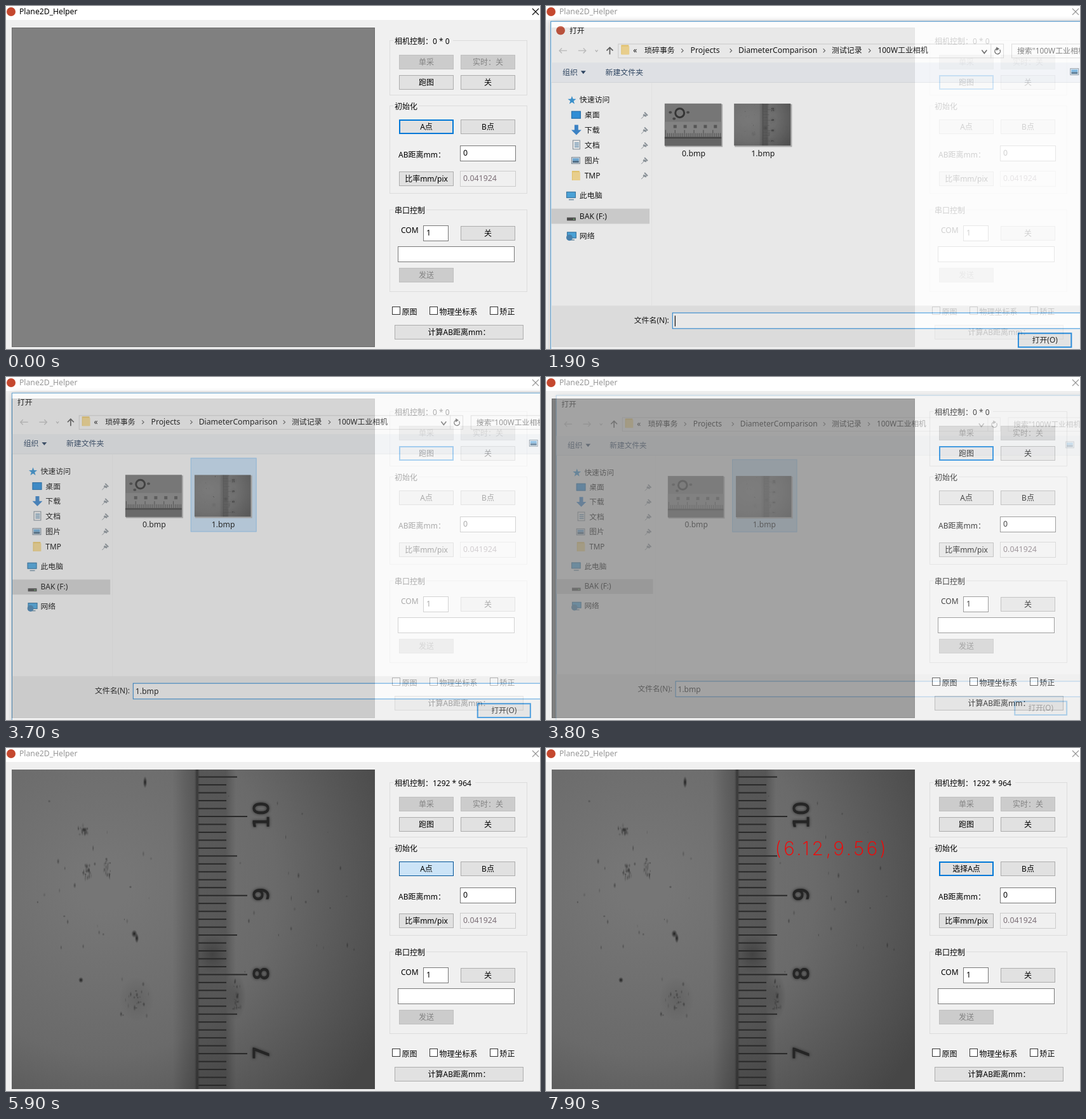
An HTML page with a canvas for the animation above (8000 ms loop, 841 px wide and 541 px high).

```html
<!DOCTYPE html>
<html lang="zh">
<head>
<meta charset="utf-8">
<style>
html, body { margin: 0; width: 100%; height: 100%; overflow: hidden; background: #f0f0f0; }
canvas { position: absolute; left: 0; top: 0; }
</style>
</head>
<body>
<canvas id="main" width="841" height="541"></canvas>
<canvas id="dialog" width="841" height="541"></canvas>
<script>
const LOOP = 8000, STEP = 100;
const BLUE = '#0078d7', SANS = '"Noto Sans","Noto Sans CJK SC","Noto Sans CJK",sans-serif';
const dialogCanvas = document.getElementById('dialog');
const mainCtx = document.getElementById('main').getContext('2d');
const dialogCtx = dialogCanvas.getContext('2d');
let g = mainCtx;

// Linear interpolation over [time, ...values] keys.
function track(t, keys) {
  if (t <= keys[0][0]) return keys[0].slice(1);
  for (let i = 1; i < keys.length; i++) {
    const [a, b] = [keys[i - 1], keys[i]];
    if (t <= b[0]) return a.slice(1).map((v, k) => v + (b[k + 1] - v) * (t - a[0]) / (b[0] - a[0]));
  }
  return keys[keys.length - 1].slice(1);
}

function fill(x, y, w, h, color) { g.fillStyle = color; g.fillRect(x, y, w, h); }
function frame(x, y, w, h, color, line = 1) {
  g.strokeStyle = color; g.lineWidth = line;
  g.strokeRect(x + line / 2, y + line / 2, w - line, h - line);
}
function box(x, y, w, h, color, edge, line) { fill(x, y, w, h, color); frame(x, y, w, h, edge, line); }
function text(s, x, y, { color = '#000', size = 12, align = 'left' } = {}) {
  g.font = `${size}px ${SANS}`; g.textAlign = align; g.fillStyle = color;
  g.fillText(s, x, y + 4.5);
}
function poly(color, line, ...pts) {
  g.beginPath();
  for (let i = 0; i < pts.length; i += 2) g.lineTo(pts[i], pts[i + 1]);
  if (line) { g.strokeStyle = color; g.lineWidth = line; g.stroke(); }
  else { g.fillStyle = color; g.fill(); }
}
function dot(x, y, rx, ry, color) {
  g.beginPath(); g.ellipse(x, y, rx, ry, 0, 0, 7); g.fillStyle = color; g.fill();
}
function smudge(x, y, rx, ry, alpha) {
  g.save();
  g.translate(x, y); g.scale(rx, ry);
  const soft = g.createRadialGradient(0, 0, 0, 0, 0, 1);
  soft.addColorStop(0, `rgba(20,20,20,${alpha})`); soft.addColorStop(1, 'rgba(20,20,20,0)');
  dot(0, 0, 1, 1, soft);
  g.restore();
}
function chevronRight(x, y) { poly('#555', 1.1, x - 1.5, y - 3, x + 1.5, y, x - 1.5, y + 3); }
function chevronDown(x, y, r, color, line) { poly(color, line, x - r, y - r, x, y + r * .3, x + r, y - r); }

const buttonLooks = {
  normal: ['#e1e1e1', '#adadad', 1], focus: ['#e1e1e1', BLUE, 2], hover: ['#e5f1fb', BLUE, 1],
  warm: ['#e3e9ee', '#57929f', 1], press: ['#cce4f7', '#005499', 1], off: ['#cccccc', '#bfbfbf', 1]
};
function button(x, y, label, look = 'normal', w = 86) {
  box(x, y, w, 23, ...buttonLooks[look]);
  text(label, x + w / 2, y + 11.5, { align: 'center', color: look === 'off' ? '#838383' : '#000' });
}
function group(y, h, label, w) {
  frame(604, y, 217, h, '#dcdcdc');
  fill(610, y - 5, w, 10, '#f0f0f0');
  text(label, 612, y + 1);
}

function photo() {
  g.save();
  g.beginPath(); g.rect(9, 34, 572, 504); g.clip();
  const glow = g.createRadialGradient(155, 215, 40, 155, 215, 500);
  glow.addColorStop(0, '#767676'); glow.addColorStop(.5, '#6a6a6a'); glow.addColorStop(1, '#464646');
  fill(9, 34, 572, 504, glow);
  const band = g.createLinearGradient(262, 0, 362, 0);
  [[0, 0], [.2, .12], [.35, .2], [.39, .5], [.43, .2], [.84, .2], [1, 0]]
    .forEach(([p, a]) => band.addColorStop(p, `rgba(0,0,0,${a})`));
  fill(262, 34, 100, 504, band);

  // Small stains on the plate, some of them gathered around [x, y, spread x, spread y].
  let seed = 7;
  const rnd = () => (seed = seed * 16807 % 2147483647) / 2147483647;
  const spread = () => rnd() + rnd() - 1;
  const stains = [[130, 230, 120, 190], [450, 230, 120, 190], [122, 129, 9, 9], [127, 196, 8, 16],
    [160, 188, 8, 20], [206, 396, 26, 36], [362, 392, 10, 34]];
  for (const [x, y, w, h] of stains) {
    for (let i = 0; i < 24; i++) {
      smudge(x + spread() * w, y + spread() * h, 1 + rnd() * 1.5, 1.5 + rnd() * 4, .15 + rnd() * .3);
    }
  }
  smudge(206, 396, 28, 36, .12);
  smudge(362, 392, 16, 38, .25);
  smudge(325, 325, 26, 30, .3);
  [[202, 293, 3, 4], [206, 300, 2, 5], [118, 366, 2.5, 3], [219, 54, 2, 6]].forEach(s => smudge(s[0], s[1], s[2] * 1.6, s[3] * 1.6, .9));

  // Millimetre scale, longer marks at every fifth and tenth.
  for (let i = -5; i < 35; i++) {
    const y = 108 + i * 12.47;
    const end = i % 10 === 0 ? 380 : i % 5 === 0 ? 364 : 347;
    fill(303, y - 1, end - 303, 2, '#292929');
  }
  g.font = '34px "DejaVu Sans",sans-serif'; g.textAlign = 'center';
  g.fillStyle = g.strokeStyle = '#222'; g.lineWidth = 1;
  [10, 9, 8, 7].forEach((n, i) => {
    g.save(); g.translate(414, 106 + i * 125); g.rotate(-Math.PI / 2);
    g.shadowColor = '#333'; g.shadowBlur = 4;
    g.fillText(n, 0, 0); g.strokeText(n, 0, 0); g.restore();
  });
  g.restore();
}

// Live coordinates next to the pointer, in millimetres from the image centre.
const pointerPath = [[6100, 520, 173], [6300, 430, 122], [6400, 395, 109], [6700, 339, 160],
  [7200, 310, 147], [7400, 310, 147], [7500, 330, 146], [7700, 378, 144], [7800, 378, 144], [7900, 364.3, 143]];
function coordinates(t) {
  const [left, top] = track(t, pointerPath);
  const x = left - 4.7, y = top + 23.8, mmPerPixel = 0.041924;
  const mmX = (x - 295) * 1292 / 572 * mmPerPixel, mmY = (286 - y) * 964 / 504 * mmPerPixel;
  g.save();
  g.beginPath(); g.rect(9, 34, 572, 504); g.clip();
  g.font = '200 30px Inter,"Open Sans",sans-serif';
  g.letterSpacing = '3.6px'; g.textAlign = 'left'; g.fillStyle = '#f00';
  g.fillText(`(${mmX.toFixed(2)},${mmY.toFixed(2)})`, x + 1, top + 26);
  g.restore();
}

function drawMain(t) {
  g = mainCtx;
  const loaded = t >= 4000, picking = t >= 6000;
  fill(0, 0, 841, 541, '#f0f0f0');
  fill(0, 0, 841, 22, '#fff');
  dot(8, 9, 7, 7, '#c5482f');
  const [gray] = track(t, [[1200, 0], [1600, 150]]);
  const ink = `rgb(${gray},${gray},${gray})`;
  text('Plane2D_Helper', 21, 8.5, { color: ink, size: 12.2 });
  poly(ink, 1.1, 829, 4, 839, 14);
  poly(ink, 1.1, 839, 4, 829, 14);

  if (loaded) photo();
  else box(9, 34, 572, 504, '#808080', '#6c6c6c');
  if (t >= 6100) coordinates(t);

  group(54, 87, '相机控制：' + (loaded ? '1292 * 964' : '0 * 0'), loaded ? 129 : 94);
  button(619, 77, '单采', 'off');
  button(716, 77, '实时：关', 'off');
  button(619, 109, '跑图', t < 1300 || t >= 5900 ? 'normal' : t < 1400 ? 'hover' : t < 1500 ? 'press' : 'focus');
  button(716, 109, '关');

  group(157, 139, '初始化', 40);
  const lookA = t < 1400 ? 'focus' : t < 5400 ? 'normal' : t < 5500 ? 'warm' : t < 5900 ? 'hover'
    : t < 6000 ? 'press' : 'focus';
  button(619, 179, picking ? '选择A点' : 'A点', lookA);
  button(716, 179, 'B点');
  text('AB距离mm：', 618, 234);
  box(715, 220, 88, 25, '#fff', '#7a7a7a');
  text('0', 720, 231, { size: 12.4 });
  button(619, 261, '比率mm/pix');
  box(715, 260, 88, 25, '#f0f0f0', '#cccccc');
  text('0.041924', 720, 271, { color: '#7d7078', size: 12.4 });

  group(321, 130, '串口控制', 52);
  text('COM', 622, 353.5);
  box(657, 346, 40, 25, '#fff', '#7a7a7a');
  text('1', 662, 357, { size: 12.4 });
  button(716, 347, '关');
  box(617, 379, 184, 25, '#fff', '#7a7a7a');
  button(619, 413, '发送', 'off');

  [[608, '原图'], [667, '物理坐标系'], [762, '矫正']].forEach(([x, label]) => {
    box(x, 474, 13, 13, '#fff', '#333');
    text(label, x + 15.5, 482);
  });
  button(612, 503, '计算AB距离mm：', 'normal', 203);
}

function folder(x, y) { fill(x, y, 12, 15, '#f5cd62'); fill(x + 1, y + 2, 12, 13, '#ffe08f'); }
function monitor(x, y) { box(x, y, 15, 10, '#3fa9ea', '#2b6d9d'); fill(x + 4, y + 12, 8, 1.5, '#6b8fa8'); }
function picture(x, y) { box(x, y, 14, 11, '#eef4fa', '#788896'); fill(x + 2, y + 2, 10, 4, '#69aee0'); fill(x + 2, y + 6, 10, 3, '#3d6484'); }
function pin(y) {
  poly('#8c959d', 3, 151, y - 1, 156, y + 1);
  poly('#8c959d', 2, 153, y - 5, 158, y);
  poly('#8c959d', 1, 153, y, 148, y + 5);
}
function arrow(x, y, dir, color) {
  poly(color, 1.4, x - 6, y, x + 6, y);
  poly(color, 1.4, x + dir * 2, y - 4, x + dir * 6, y, x + dir * 2, y + 4);
}

function sidebar() {
  const icons = {
    desk: y => box(37, y - 6, 15, 12, '#1e90e8', '#1669ad'),
    down: y => poly('#2d82d2', 0, 42, y - 8, 48, y - 8, 48, y, 53, y, 45, y + 8, 37, y, 42, y),
    page: y => { box(39, y - 8, 12, 15, '#fff', '#7d8b97'); [-4, -1, 2].forEach(d => fill(42, y + d, 7, 1.5, '#5d91b8')); },
    pic: y => picture(37, y - 5),
    dir: y => folder(38, y - 7)
  };
  const star = [];
  for (let i = 0; i < 10; i++) {
    const a = i * Math.PI / 5 - Math.PI / 2, r = i % 2 ? 2.8 : 7;
    star.push(38 + r * Math.cos(a), 148 + r * Math.sin(a));
  }
  poly('#2b93da', 0, ...star);
  text('快速访问', 50, 147);
  [['desk', '桌面'], ['down', '下载'], ['page', '文档'], ['pic', '图片'], ['dir', 'TMP']].forEach(([icon, label], i) => {
    const y = 171 + i * 24;
    icons[icon](y); text(label, 58, y); pin(y + 1);
  });
  monitor(29, 293);
  text('此电脑', 50, 299);
  fill(5, 320, 156, 24, '#d9d9d9');
  fill(30, 334, 14, 5, '#424242'); fill(40, 336, 2, 1.5, '#6fd36f');
  text('BAK (F:)', 50, 331.5, { size: 12.2 });
  monitor(30, 357); dot(34, 366, 5, 5, '#3c80b5');
  text('网络', 50, 363);
}

function thumbnails(t) {
  const hovered = t >= 3600 ? -1 : t >= 3000 ? 1 : t >= 2700 ? 0 : t >= 2500 ? 1 : -1;
  if (hovered >= 0) fill(179 + hovered * 110, 126, 105, 118, '#e5f3ff');
  if (t >= 3600) box(289, 126, 105, 118, '#cce8ff', '#99d1ff');
  [185, 295].forEach(x => fill(x + 1, 154, 91, 68, '#b5b5b5'));

  fill(185, 153, 90, 67, '#747474');
  fill(185, 182, 90, 24, '#848484'); fill(185, 206, 90, 3, '#3a3a3a'); fill(185, 209, 90, 11, '#606060');
  for (let i = 0; i < 30; i++) fill(186 + i * 3, i % 5 ? 200 : 195, 1, i % 5 ? 6 : 11, '#414141');
  for (let i = 0; i < 5; i++) fill(199 + i * 16, 187, 5, 5, '#4d4d4d');
  g.beginPath(); g.arc(209, 168, 7, 0, 7); g.strokeStyle = '#252525'; g.lineWidth = 3; g.stroke();
  [[194, 167], [222, 167], [200, 177]].forEach(([x, y]) => dot(x, y, 2.5, 2, '#3a3a3a'));

  g.save();
  g.translate(295, 153); g.scale(90 / 572, 67 / 504); g.translate(-9, -34);
  photo();
  g.restore();
  text('0.bmp', 231, 232, { align: 'center', size: 12.4 });
  text('1.bmp', 341, 232, { align: 'center', size: 12.4 });
}

function drawDialog(t) {
  const [alpha, scale] = track(t, [[1700, 0, .94], [1800, .35, .968], [1900, .82, .993], [2000, 1, 1],
    [3600, 1, 1], [3700, .67, .989], [3800, .28, .974], [3900, 0, .96]]);
  dialogCanvas.style.opacity = alpha;
  if (!alpha) return;
  g = dialogCtx;
  g.setTransform(1, 0, 0, 1, 0, 0);
  g.clearRect(0, 0, 841, 541);
  g.setTransform(scale, 0, 0, scale, 450 * (1 - scale), 272 * (1 - scale));

  g.save();
  g.shadowColor = 'rgba(0,0,0,.3)'; g.shadowBlur = 9;
  fill(4, 22, 960, 640, '#fff');
  g.restore();
  frame(4, 22, 960, 640, '#1778c0');
  const closing = t >= 3700;
  if (!closing) dot(20, 37, 7, 7, '#c5482f');
  text('打开', closing ? 13 : 34, 37);

  arrow(24, 69, -1, '#c8c8c8'); arrow(54, 69, 1, '#c8c8c8');
  chevronDown(77, 70, 2, '#bbb', 1.2);
  poly('#555', 1.7, 98, 75, 98, 64); poly('#555', 1.7, 93, 69, 98, 64, 103, 69);
  frame(111, 58, 612, 23, '#d9d9d9'); fill(702, 58, 1, 23, '#d9d9d9');
  folder(116, 60);
  text('«', 135, 68);
  [[153, '琐碎事务'], [226, 'Projects'], [302, 'DiameterComparison'], [450, '测试记录'], [523, '100W工业相机']]
    .forEach(([x, label]) => text(label, x, 68.5, { size: /^[A-Z]/.test(label) ? 12.4 : 12 }));
  [213, 290, 438, 510].forEach(x => chevronRight(x, 69));
  chevronDown(692, 72, 4, '#555', 1.6);
  g.beginPath(); g.arc(713, 70, 4.3, -.6, 4.6); g.strokeStyle = '#555'; g.lineWidth = 1.4; g.stroke();
  poly('#555', 0, 711, 63, 716, 66, 711, 69);
  frame(735, 58, 220, 23, '#d9d9d9');
  text('搜索"100W工业相机"', 744, 69, { color: '#6d6d6d' });

  fill(5, 88, 958, 31, '#f3f6fa'); fill(5, 119, 958, 1, '#e2e6eb');
  text('组织', 23, 103, { color: '#1e395b' });
  poly('#1e395b', 0, 52, 101, 60, 101, 56, 106);
  text('新建文件夹', 91, 103, { color: '#1e395b' });
  picture(828, 97);
  sidebar();
  fill(164, 120, 1, 354, '#f7f7f7');
  thumbnails(t);

  fill(5, 474, 958, 187, '#f0f0f0');
  text('文件名(N):', 192, 497, { align: 'right' });
  box(197, 485, 760, 26, '#fff', BLUE);
  if (t >= 3600) text('1.bmp', 201, 498, { size: 12.4 });
  else if (t < 2300 || (t >= 2800 && t < 3300)) fill(201, 490, 1.3, 17, '#000');
  box(745, 517, 86, 24, '#e1e1e1', BLUE, 2);
  text('打开(O)', 788, 528, { align: 'center' });
}

const start = performance.now();
let shown = -1;
function tick(now) {
  const elapsed = Math.max(0, now - start) % LOOP;
  const t = Math.floor(elapsed / STEP) * STEP;
  if (t !== shown) {
    shown = t;
    drawMain(t);
    drawDialog(t);
  }
  requestAnimationFrame(tick);
}
tick(start);
</script>
</body>
</html>
```
